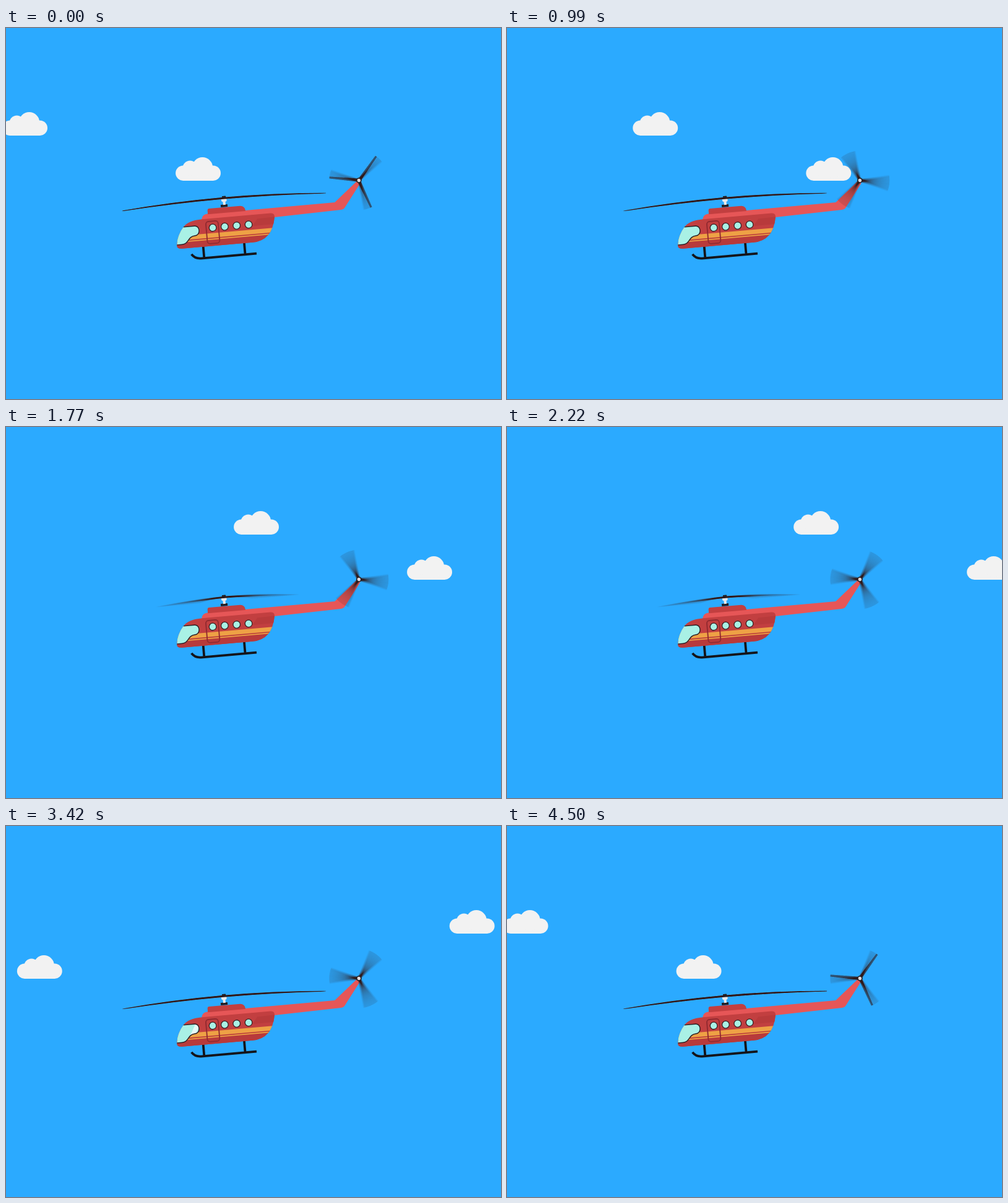
Write an HTML page with a canvas that moves like this. It is 800 by 600 pixels and loops after 4530 ms.

```html
<!DOCTYPE html>
<html lang="en">
<head>
<meta charset="utf-8">
<title>Helicopter</title>
<style>
  html, body { margin: 0; width: 100%; height: 100%; overflow: hidden; background: #2baaff; }
  canvas { display: block; width: 800px; height: 600px; }
</style>
</head>
<body>
<canvas id="stage" width="800" height="600"></canvas>
<script>
const W = 800, H = 600, LOOP = 4530, STEP = 30, LAST = 150;
const RAD = Math.PI / 180, SAMPLES = 24, SHUTTER = 0.5;
const SKY = '#2baaff', DARK = '#241f23', GLASS = '#a9f1e5';
const RED = '#e65657', BODY = '#c23f40', BELLY = '#b83a3b', GOLD = '#eea145';

const ctx = document.getElementById('stage').getContext('2d');

// Layer that adds up the motion blur samples
const layer = Object.assign(document.createElement('canvas'), { width: W, height: H });
const blur = layer.getContext('2d');

// The helicopter is drawn level, with its rotor hub at the origin
function pose(c) {
  c.setTransform(1, 0, 0, 1, 352, 275);
  c.rotate(-5 * RAD);
}

const nose = 'M-82 69Q-80 53 -69 41';
const rim = 'H-51C-42 41 -42 56.7 -52 56.7C-64 57 -62 69 -74 69H-82';
const glass = new Path2D(nose + rim);
const frame = new Path2D('M-69 41' + rim);
const body = new Path2D(nose + 'Q-61 31 -38 31H73Q80 31 79 38Q72 75.5 40 75.5H-74Q-83 75.5 -82 69Z');
const boom = new Path2D('M-39 32Q-37 23 -29 23L178 22.5L216 -8L222 -5L193 33Q191 35.5 187 35.5L77 38Z');
const skid = new Path2D('M-60 86Q-55 94 -45 94H45M-40 74V94M26.5 74V94');
const rotor = new Path2D('M-165 6Q0 -8.5 165 6V7Q0 -3.5 -165 7Z');
const blade = new Path2D('M0 -2.6L48 -1.6V1.6L0 2.6Z');

function fill(color, path) {
  ctx.fillStyle = color;
  ctx.fill(path);
}

function line(color, width, path) {
  ctx.strokeStyle = color;
  ctx.lineWidth = width;
  ctx.stroke(path);
}

function box(x, y, w, h, r = 0) {
  const p = new Path2D();
  p.roundRect(x, y, w, h, r);
  return p;
}

function disc(x, y, r) {
  const p = new Path2D();
  p.arc(x, y, r, 0, 2 * Math.PI);
  return p;
}

function clipped(path, draw) {
  ctx.save();
  ctx.clip(path);
  draw();
  ctx.restore();
}

// A cloud leaves on the right, then returns from the left a little faster
function drawCloud(t, start, top, back) {
  const x = t < back ? start + 0.2113 * t : start - 0.5 + 0.2368 * (t - LAST * STEP);
  ctx.setTransform(1, 0, 0, 1, x, top);
  ctx.lineCap = 'round';
  line('#f2f2f2', 24.4, new Path2D('M12.3 26H60.8'));
  ctx.lineCap = 'butt';
  fill('#f2f2f2', disc(23.5, 17.7, 12));
  fill('#f2f2f2', disc(43.5, 17, 16.7));
}

function smear(n, draw) {
  blur.resetTransform();
  blur.clearRect(0, 0, W, H);
  blur.globalCompositeOperation = 'lighter';
  blur.globalAlpha = 1 / SAMPLES;
  blur.fillStyle = DARK;
  for (let i = 0; i < SAMPLES; i++) {
    const f = n + ((i + 0.5) / SAMPLES - 0.5) * SHUTTER;
    pose(blur);
    draw(Math.min(LAST, Math.max(0, f)));
  }
  ctx.resetTransform();
  ctx.drawImage(layer, 0, 0);
  pose(ctx);
}

// Seen edge-on: the turn shows as a changing width
function mainRotor(f) {
  const a = 60 * f * RAD;
  blur.translate(-6 * Math.sin(2 * a), 0);
  blur.scale(Math.abs(Math.cos(a)), 1);
  blur.fill(rotor);
}

function tailRotor(f) {
  blur.translate(220, -9.4);
  blur.rotate((60 * f - 49.5) * RAD);
  for (let i = 0; i < 3; i++) {
    blur.fill(blade);
    blur.rotate(120 * RAD);
  }
}

function drawGlint(t) {
  if (t < LOOP / 2) return;
  const x = -67 - 0.032 * (t - 3930);
  const ray = (c, w) => line('rgba(255,255,255,.7)', w, new Path2D(`M${c + 11} 36L${c - 11} 75`));
  clipped(glass, () => {
    ray(x - 3, 7);
    ray(x + 4.5, 2.6);
  });
}

function drawBody(t) {
  line('#14151a', 3.8, skid);
  fill(RED, boom);
  fill(BODY, box(-28, 15, 61, 9, [3, 8, 0, 0]));
  fill(BODY, body);
  clipped(body, () => {
    fill(BELLY, new Path2D('M42 49L51 38L90 37V49Z'));
    fill(BELLY, box(-90, 62, 180, 20));
    fill(GOLD, box(-90, 55, 180, 7.2));
    fill(GOLD, box(-90, 63.8, 180, 1.7));
  });

  fill(GLASS, glass);
  drawGlint(t);
  line('#2a1d22', 1.4, frame);

  line('#912a30', 1.9, box(-32.6, 35.7, 20, 36, 4.5));
  for (let i = 0; i < 4; i++) {
    const pane = disc(-22 + 19.4 * i, 46.2, 5.8);
    fill(GLASS, pane);
    line('#3b2024', 1.3, pane);
  }
}

function drawHub() {
  fill(DARK, box(-6, 10.5, 11, 4));
  fill('#e9eaec', box(-4.3, 0.5, 8.6, 5.5, 2));
  fill('#e9eaec', box(-2, 5, 4, 6));
}

function draw(n) {
  const t = n * STEP;
  ctx.resetTransform();
  ctx.fillStyle = SKY;
  ctx.fillRect(0, 0, W, H);
  drawCloud(t, -6, 135.7, 4000);
  drawCloud(t, 274, 208.7, 2800);
  pose(ctx);
  drawBody(t);
  drawHub();
  smear(n, mainRotor);
  fill(DARK, box(-3, -3.2, 6.4, 4, 1));
  smear(n, tailRotor);
  fill(DARK, disc(220, -9.4, 4.4));
  fill('#e3d8d8', disc(220, -9.4, 2.7));
}

function tick() {
  draw(Math.floor(performance.now() % LOOP / STEP + 1e-6));
  requestAnimationFrame(tick);
}
tick();
</script>
</body>
</html>
```
